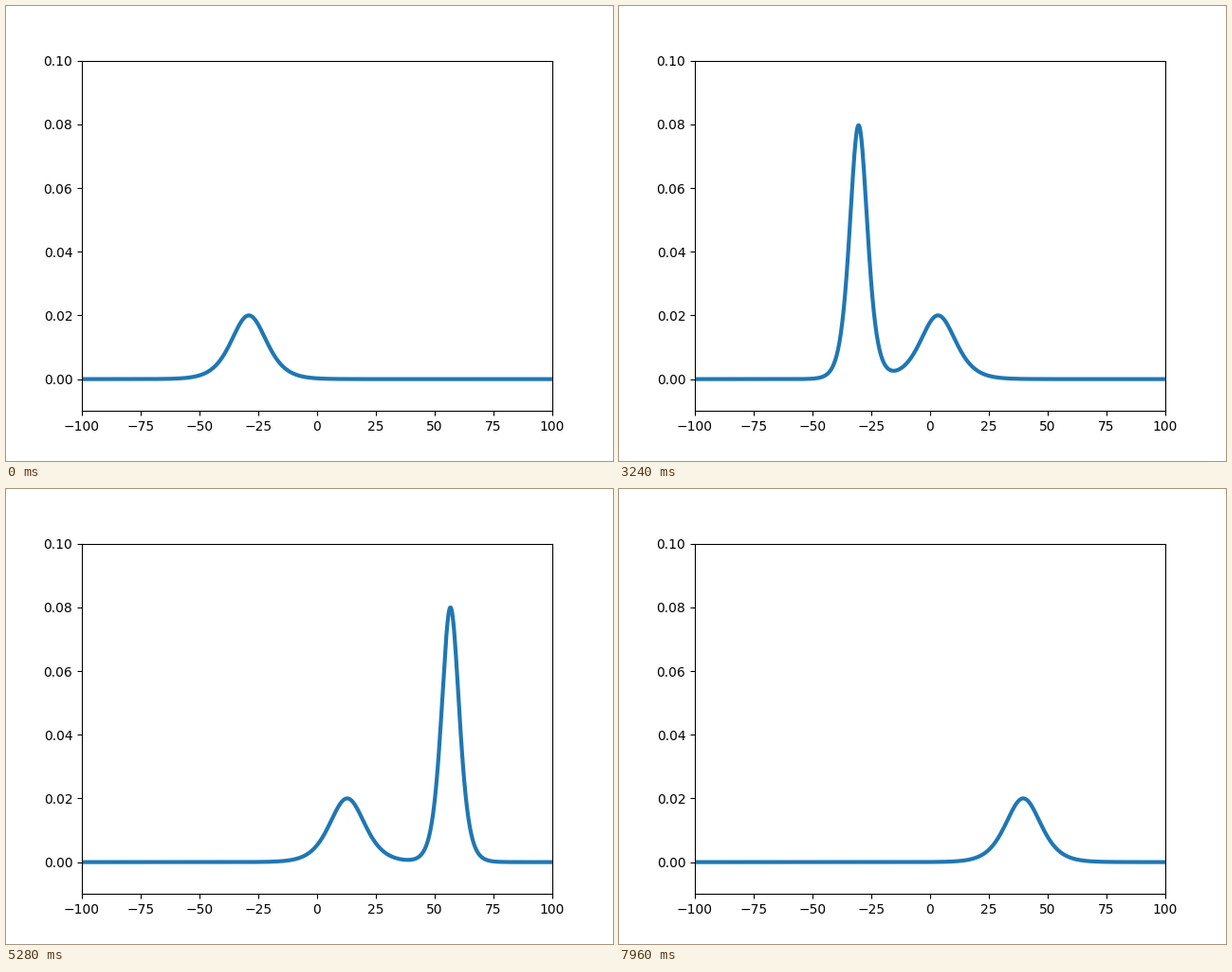
Write a matplotlib script that moves like this. It is 640 px wide and 480 px high and loops after 8 s.

```python
import numpy as np
import matplotlib.pyplot as plt
from matplotlib.animation import FuncAnimation

FRAMES = 200
DT = 10
T0 = -1000
K1, K2 = 0.2, 0.1
A = ((K1 - K2) / (K1 + K2)) ** 2

x = np.linspace(-100, 100, 1000)


def two_solitons(t):
    """KdV two-soliton solution u = 2 (ln tau)_xx."""
    a, b = 2 * K1, 2 * K2
    e1 = np.exp(a * (x - 4 * K1**2 * t))
    e2 = np.exp(b * (x - 4 * K2**2 * t))
    e12 = A * e1 * e2
    tau = 1 + e1 + e2 + e12
    d1 = (a * e1 + b * e2 + (a + b) * e12) / tau
    d2 = (a**2 * e1 + b**2 * e2 + (a + b) ** 2 * e12) / tau
    return 2 * (d2 - d1**2)


fig, ax = plt.subplots(figsize=(6.4, 4.8), dpi=100)
ax.set_xlim(-100, 100)
ax.set_ylim(-0.01, 0.1)
line, = ax.plot(x, two_solitons(T0), lw=3)


def update(i):
    line.set_ydata(two_solitons(T0 + DT * i))
    return line,


anim = FuncAnimation(fig, update, frames=FRAMES, interval=40,
                     repeat=True, repeat_delay=0)
plt.show()
```
